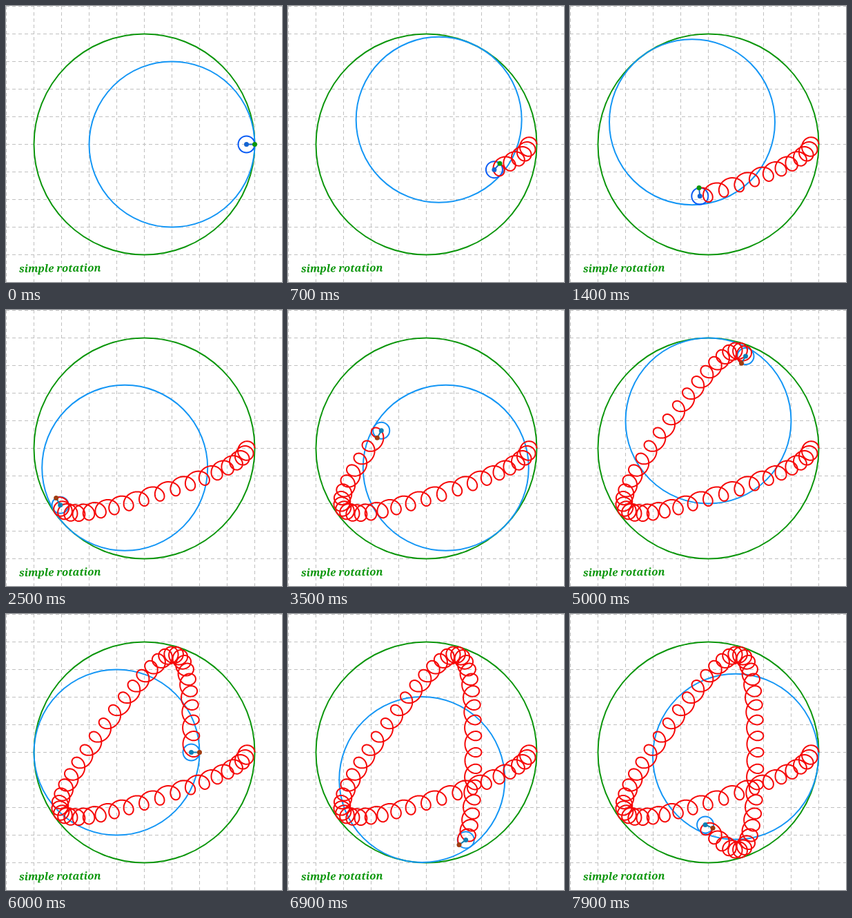
Animation of 400x400 px, one loop 8 s. Source, as an HTML page:

```html
<!DOCTYPE html>
<html lang="en">
<head>
<meta charset="utf-8">
<title>Rolling circles</title>
<style>
  html, body { margin: 0; width: 100%; height: 100%; overflow: hidden; background: #fff; }
  svg { display: block; width: 100vw; height: 100vh; }
  .line { fill: none; stroke-width: 2; }
  #grid { fill: none; stroke: #c0c0c0; stroke-dasharray: 5 4; }
  #outer { stroke: #0c960c; }
  #middle { stroke: #1496f5; }
  #trace { stroke: #f60808; stroke-linejoin: round; }
  text { font: italic bold 15px "Noto Serif", "Liberation Serif", serif; fill: #0c960c; }
</style>
</head>
<body>
<svg viewBox="0 0 400 400">
  <path id="grid"/>
  <circle id="outer" class="line" cx="200.5" cy="200.5" r="160"/>
  <circle id="middle" class="line" r="120"/>
  <circle id="small" class="line" r="12"/>
  <polyline id="trace" class="line"/>
  <line id="arm" class="line"/>
  <circle id="hub" r="3.5"/>
  <circle id="pen" r="3.5"/>
  <text x="19" y="386" transform="rotate(-0.7 19 386)">simple rotation</text>
</svg>
<script>
  const LOOP = 8000, STEP = 100, SAMPLES = 36;
  const $ = id => document.getElementById(id);
  const set = (id, attrs) => {
    for (const key in attrs) $(id).setAttribute(key, attrs[key]);
  };
  const polar = ([x, y], radius, degrees) => {
    const a = degrees * Math.PI / 180;
    return [x + radius * Math.cos(a), y - radius * Math.sin(a)];
  };

  // Centres of the two rolling circles and the pen after n steps
  function pose(n) {
    const middle = polar([200.5, 200.5], 40, 9 * n);
    const small = polar(middle, 108, -6 * n);
    return { middle, small, pen: polar(small, 12, 264 * n) };
  }

  let grid = "";
  for (let p = 0.5; p < 400; p += 40) grid += `M0 ${p}H400M${p} 0V400`;
  set("grid", { d: grid });

  const points = [];
  for (let i = 0; i <= (LOOP / STEP) * SAMPLES; i++) {
    points.push(pose(i / SAMPLES).pen.map(v => v.toFixed(2)).join());
  }

  const place = (id, [cx, cy]) => set(id, { cx, cy });
  let shown = -1;

  function draw(n) {
    const { middle, small, pen } = pose(n);
    const early = n < 20;
    const hubColor = early ? "#1464d2" : "#107fb4";
    place("middle", middle);
    place("small", small);
    place("hub", small);
    place("pen", pen);
    set("small", { stroke: early ? "#0a5cf5" : "#1490f5" });
    set("hub", { fill: hubColor });
    set("pen", { fill: early ? "#0c960c" : "#a03c10" });
    set("arm", { x1: small[0], y1: small[1], x2: pen[0], y2: pen[1], stroke: hubColor });
    set("trace", { points: n ? points.slice(0, n * SAMPLES + 1).join(" ") : "" });
  }

  const start = performance.now();
  function tick() {
    const n = Math.floor(((performance.now() - start) % LOOP) / STEP);
    if (n !== shown) draw(shown = n);
    requestAnimationFrame(tick);
  }
  tick();
</script>
</body>
</html>
```
